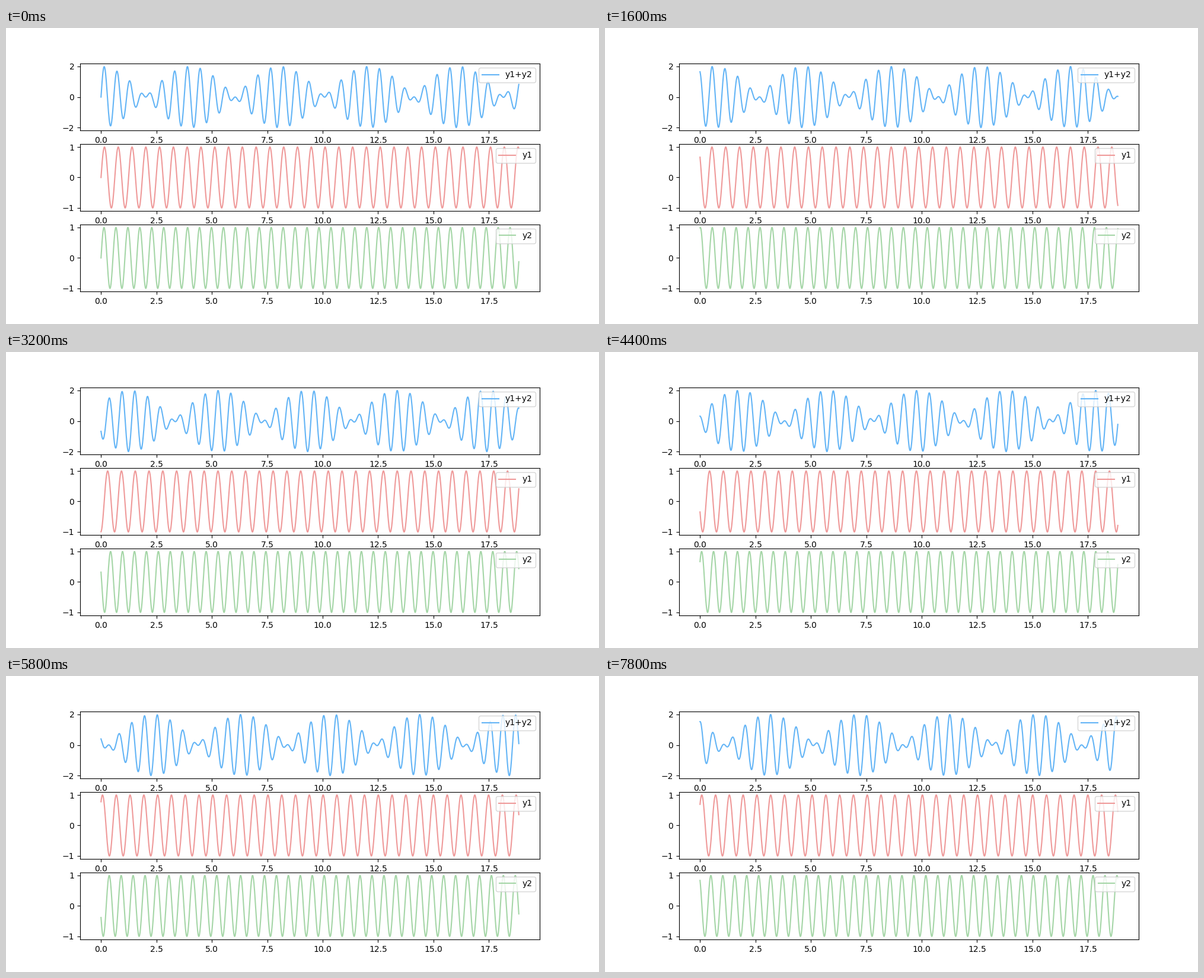
These frames come from a looping animation (1000x500 px, 8000 ms). A matplotlib script:

```python
import numpy as np
import matplotlib.pyplot as plt
from matplotlib.animation import FuncAnimation

FRAMES = 40
INTERVAL = 200
TIME_STEP = 2 * np.pi / 50

# (wave number, angular frequency) of the two travelling waves
WAVE_1 = (10.1, 10.1)
WAVE_2 = (11.66, 11.1)

x = np.linspace(0, 6 * np.pi, 2000)


def wave(params, t):
    k, omega = params
    return np.sin(k * x - omega * t)


def curves(frame):
    t = frame * TIME_STEP
    y1, y2 = wave(WAVE_1, t), wave(WAVE_2, t)
    return y1 + y2, y1, y2


fig, axes = plt.subplots(3, 1, figsize=(10, 5), dpi=100)
labels = ("y1+y2", "y1", "y2")
colors = ("#64b5f6", "#ef9a9a", "#a5d6a7")

lines = []
for ax, y, label, color in zip(axes, curves(0), labels, colors):
    line, = ax.plot(x, y, color=color, label=label)
    ax.legend(loc="upper right")
    lines.append(line)


def update(frame):
    for line, y in zip(lines, curves(frame)):
        line.set_ydata(y)
    return lines


anim = FuncAnimation(fig, update, frames=FRAMES, interval=INTERVAL, repeat=True)
plt.show()
```
